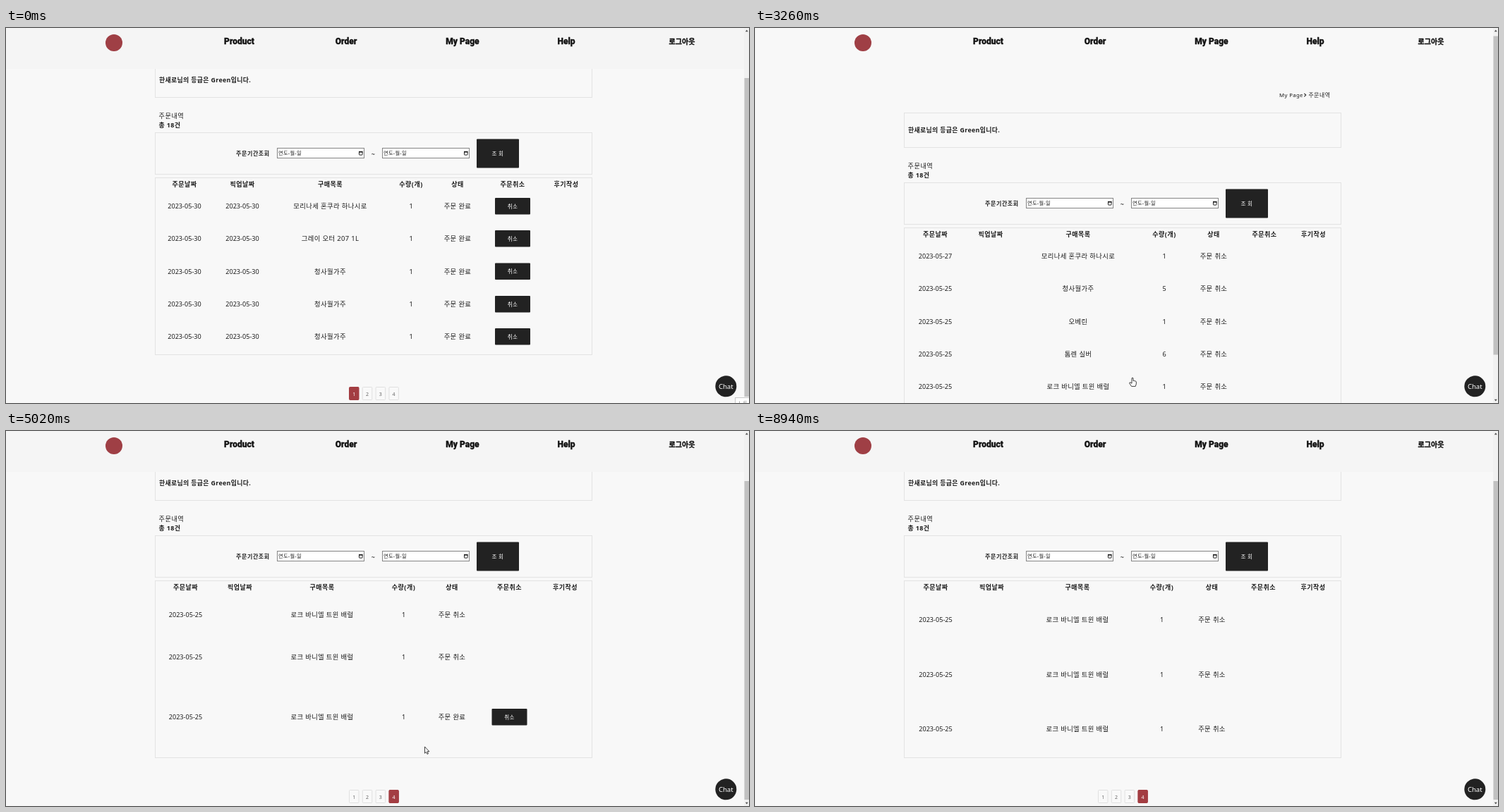
Write an HTML page that moves like this. It is 1053 px wide and 532 px high and loops after 9.2 s.

```html
<!DOCTYPE html>
<html lang="ko">
<head>
<meta charset="utf-8">
<title>주문내역</title>
<style>
html, body { margin: 0; width: 100%; height: 100%; overflow: hidden; background: #f8f8f8; }
svg { display: block; width: 1053px; height: 532px; }
text { font-family: "Noto Sans", "Noto Sans CJK KR", "Noto Sans CJK", sans-serif; white-space: pre; }
.nav text { font-family: Roboto, "Noto Sans CJK KR", "Noto Sans CJK", sans-serif; }
</style>
</head>
<body>
<svg id="stage" viewBox="0 0 1053 532"></svg>
<script>
const LOOP = 9200, MAX_SCROLL = 74, SCROLL_MS = 160;
const stage = document.getElementById('stage');

function add(parent, tag, attrs, content) {
  const el = document.createElementNS('http://www.w3.org/2000/svg', tag);
  for (const k in attrs) el.setAttribute(k, attrs[k]);
  if (content !== undefined) el.textContent = content;
  parent.appendChild(el);
  return el;
}
// y is the middle of the line
function label(parent, str, x, y, size, opt = {}) {
  return add(parent, 'text', {
    x, y: y + size * 0.36, 'font-size': size, 'text-anchor': opt.anchor || 'middle',
    fill: opt.fill || '#1c1c1c', 'font-weight': opt.weight || 400, 'letter-spacing': opt.gap || 0
  }, str);
}
function box(parent, x, y, width, height, fill, stroke, rx = 0) {
  return add(parent, 'rect', { x, y, width, height, fill, stroke: stroke || 'none', rx });
}
function button(parent, x, y, w, h, str, size) {
  box(parent, x - w / 2, y - h / 2, w, h, '#222', null, 1);
  label(parent, str, x, y, size, { fill: '#fff', gap: 0.3 });
}

// ---------- content that scrolls ----------
const body = add(stage, 'g', {});
const start = { anchor: 'start' };
label(body, 'My Page', 743, 98, 7.8, { ...start, gap: 0.35 });
add(body, 'path', { d: 'M778.4 95.8l2.3 2.3l-2.3 2.3', fill: 'none', stroke: '#222', 'stroke-width': 1.1 });
label(body, '주문내역', 784.5, 98, 7.8, { ...start, gap: 0.6 });
for (const [y, h] of [[123.5, 49], [222.5, 59], [286.5, 251]]) box(body, 211.5, y, 619, h, 'none', '#e3e3e3');
label(body, '한새로님의 등급은 Green입니다.', 217, 148, 8.9, { ...start, weight: 700, gap: 0.35 });
label(body, '주문내역', 216.5, 199, 9.2, { ...start, weight: 500, gap: 0.5 });
label(body, '총 18건', 216.5, 211.5, 9, { ...start, weight: 700, gap: 0.35 });
label(body, '주문기간조회', 326, 252, 8, { ...start, weight: 700, gap: 0.6 });
for (const x of [384, 533]) {
  box(body, x + 0.5, 244.5, 123, 14, '#fff', '#858585');
  label(body, '연도-월-일', x + 2, 251.7, 7.2, { ...start, gap: 0.3 });
  box(body, x + 116.5, 249.5, 4.6, 4.6, 'none', '#222', 0.5);
  box(body, x + 116, 248.8, 5.6, 1.8, '#222');
}
label(body, '~', 520.3, 252.5, 9);
button(body, 697, 252, 60, 41, '조 회', 7.6);

const HEADS = ['주문날짜', '픽업날짜', '구매목록', '수량(개)', '상태', '주문취소', '후기작성'];
const SAKE = '모리나세 혼쿠라 하나시로', WINE = '청사월가주', CASK = '로크 바니엘 트윈 배럴';
const EVEN = [327, 373, 419.5, 466, 512];
// row: day, pickup day, item, quantity, open order
const PAGES = [
  { num: 1, cols: [253, 335, 459.5, 574, 640, 718, 794], ys: EVEN, rows: [
    [30, 30, SAKE, 1, 1], [30, 30, '그레이 오터 207 1L', 1, 1],
    [30, 30, WINE, 1, 1], [30, 30, WINE, 1, 1], [30, 30, WINE, 1, 1]] },
  { num: 2, cols: [251.5, 331, 461, 581.5, 645.5, 721.5, 795], ys: [330, 381, 432, 483, 522], rows: [
    [30, 30, WINE, 1, 1], [29, 0, SAKE, 1, 1], [29, 0, '카사 벨루나 모라비노 다르체', 1, 1],
    [29, 29, '그린 새틴', 1, 1], [27, 0, WINE, 3, 0]] },
  { num: 3, cols: [255.5, 334, 458, 580, 650, 722, 791.5], ys: EVEN, rows: [
    [27, 0, SAKE, 1, 0], [25, 0, WINE, 5, 0], [25, 0, '오베린', 1, 0],
    [25, 0, '톰렌 실버', 6, 0], [25, 0, CASK, 1, 0]] },
  { num: 4, cols: [254.5, 331.5, 448, 563.5, 632, 713.5, 792.5], ys: [335, 395, 480], rows: [
    [25, 0, CASK, 1, 0], [25, 0, CASK, 1, 0], [25, 0, CASK, 1, 1]] },
  { num: 4, cols: [256, 335.5, 457, 576.5, 647.5, 720.5, 791], ys: [342, 419.5, 497], rows: [
    [25, 0, CASK, 1, 0], [25, 0, CASK, 1, 0], [25, 0, CASK, 1, 0]] }
];

function buildPage({ num, cols, ys, rows }) {
  const g = add(body, 'g', {});
  HEADS.forEach((h, i) => label(g, h, cols[i], 296, 9, { weight: 700, gap: 0.5 }));
  rows.forEach(([day, pick, item, qty, open], i) => {
    const y = ys[i], kor = { gap: 0.35 };
    label(g, '2023-05-' + day, cols[0], y, 9.1);
    if (pick) label(g, '2023-05-' + pick, cols[1], y, 9.1);
    label(g, item, cols[2], y, 9.4, kor);
    label(g, qty, cols[3], y, 9.1);
    label(g, open ? '주문 완료' : '주문 취소', cols[4], y, 9.4, kor);
    if (open) button(g, cols[5], y - 0.2, 50, 23.5, '취소', 7.5);
  });
  for (let n = 1; n <= 4; n++) {
    const x = 493 + (n - 1) * 18.8, on = n === num;
    box(g, x - 6.5, 583.5, 13.5, 18, on ? '#a33d42' : '#f9f9f9', on ? '#a33d42' : '#e0e0e0', 1);
    label(g, n, x + 0.2, 593, 7, { fill: on ? '#fff' : '#666' });
  }
  return g;
}
const views = PAGES.map(buildPage);

// ---------- fixed parts ----------
const band = box(stage, 0, 0, 1046, 37, '#f5f5f5');
add(stage, 'circle', { cx: 153, cy: 21, r: 12, fill: '#9f3f45' });
const nav = add(stage, 'g', { class: 'nav' });
[['Product', 330.5], ['Order', 482], ['My Page', 647], ['Help', 794], ['로그아웃', 958]].forEach(([s, x], i) => {
  const size = i === 4 ? 10 : 12;
  const t = label(nav, s, x, 19, size, { weight: 900, fill: '#111' });
  t.setAttribute('stroke', '#111');
  t.setAttribute('stroke-width', 0.3);
});
add(stage, 'circle', { cx: 1020.3, cy: 508.3, r: 15, fill: '#222' });
label(stage, 'Chat', 1020.3, 508.8, 9.6, { fill: '#fff' });

box(stage, 1046, 0, 7, 532, '#f1f1f1');
const thumb = box(stage, 1046.5, 9, 6.5, 452, '#c1c1c1');
add(stage, 'path', { d: 'M1047.8 5.2h4l-2-2.6zM1047.8 526.8h4l-2 2.6z', fill: '#555' });

const tip = add(stage, 'g', {});
box(tip, 1033.5, 524.5, 24, 12, '#fff', '#c8c8c8');
label(tip, '노트', 1038, 532, 7, { ...start, fill: '#777' });

const pointer = add(stage, 'g', {});
const arrow = add(pointer, 'path', {
  d: 'M0 0V9.3L2.1 7.4L3.5 10.5L5 9.8L3.6 6.8H6.4Z', fill: '#fff', stroke: '#111', 'stroke-width': 0.8
});
const hand = add(pointer, 'path', {
  d: 'M-1 .8Q0-.6 1 .8V4.4L2.4 4.3L3 4.9L4.2 4.9L5.3 5.7V9L4.2 12.4H-1.4L-4.2 8.2Q-4.6 6.6-3 6.8L-1 8.2Z',
  fill: '#fff', stroke: '#111', 'stroke-width': 0.8, 'stroke-linejoin': 'round'
});

// ---------- timeline ----------
// time, page index, scroll start, header growth start
const VISITS = [
  [0, 0, -1000, -1000], [1330, 1, 2030, 2145], [2670, 2, 3240, 3355],
  [3890, 3, 4620, 4735], [5810, 0, -1000, 6110], [7380, 4, 7813, 7925]
];
// time, x, y, hand
const MOVES = [
  [30, 1050, 521, 0], [260, 880, 472, 0], [740, 512, 515, 1], [1730, 512, 515, 0],
  [2080, 539.5, 471, 0], [2230, 539.5, 471, 0], [2530, 531, 514, 1], [2670, 531, 514, 1],
  [3150, 535, 496, 1], [3420, 535, 496, 0], [3740, 549, 512, 1], [3950, 549, 512, 0],
  [4450, 573, 455, 0], [4830, 573, 455, 0], [5600, 706, 409, 1], [5810, 706, 409, 0],
  [6290, 706, 409, 0], [6720, 581, 511, 0], [6750, 581, 511, 0], [7020, 549, 514, 1],
  [7420, 549, 514, 0], [7840, 779, 450, 0], [8520, 779, 450, 0], [8930, 1054, 522, 0]
];

const ease = x => { x = Math.min(1, Math.max(0, x)); return x * x * (3 - 2 * x); };
const lastBefore = (list, t) => list.reduce((k, e, i) => e[0] <= t ? i : k, -1);
const show = (el, on) => el.setAttribute('visibility', on ? 'visible' : 'hidden');

function drawPointer(t) {
  const i = lastBefore(MOVES, t), on = i >= 0 && i < MOVES.length - 1;
  show(arrow, on && !MOVES[i][3]);
  show(hand, on && MOVES[i][3]);
  if (!on) return;
  const a = MOVES[i], b = MOVES[i + 1], k = ease((t - a[0]) / (b[0] - a[0]));
  const x = a[1] + (b[1] - a[1]) * k, y = a[2] + (b[2] - a[2]) * k;
  pointer.setAttribute('transform', `translate(${x} ${y})`);
}

function draw(t) {
  const [, page, scrollAt, growAt] = VISITS[lastBefore(VISITS, t)];
  const scroll = Math.round(MAX_SCROLL * ease((t - scrollAt) / SCROLL_MS));
  views.forEach((v, i) => show(v, i === page));
  body.setAttribute('transform', `translate(0 ${-scroll})`);
  thumb.setAttribute('y', 9 + scroll * 62 / MAX_SCROLL);
  band.setAttribute('height', Math.round(37 + 21 * ease((t - growAt) / 250)));
  band.setAttribute('fill', scroll > 5 ? '#f5f5f5' : '#f8f8f8');
  show(tip, t < 30);
  drawPointer(t);
}

const begin = performance.now();
function tick() {
  draw((performance.now() - begin) % LOOP);
  requestAnimationFrame(tick);
}
tick();
</script>
</body>
</html>
```
